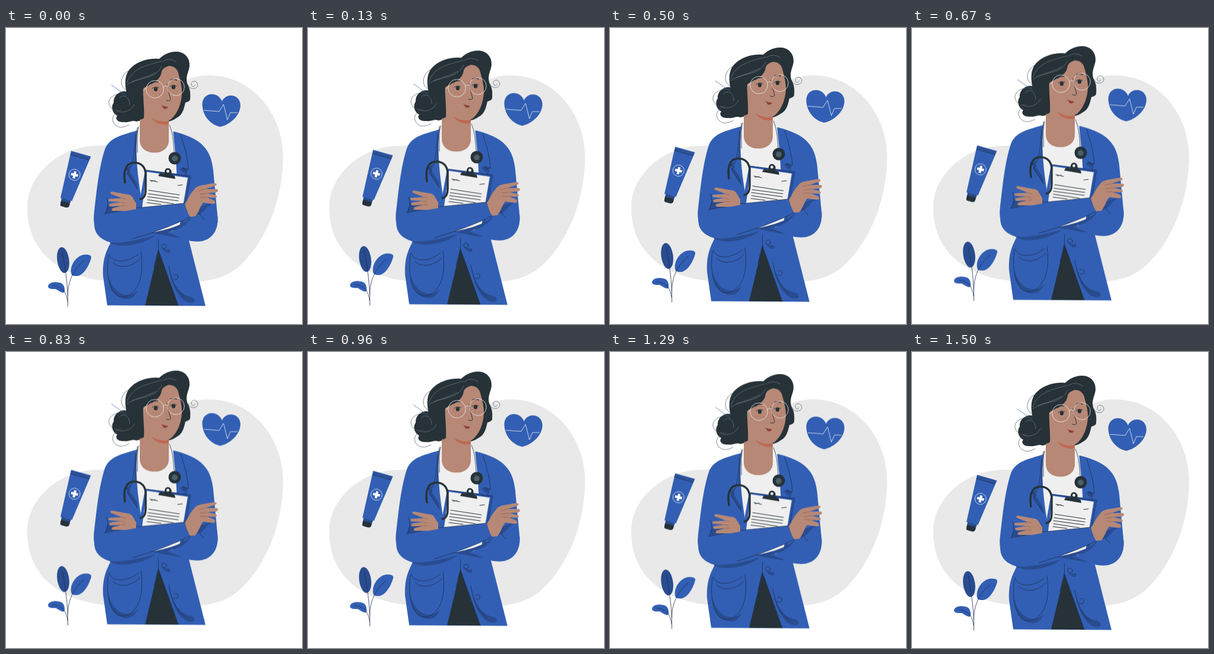
Animation of 500x500 px, one loop 1.54 s. Source, as an HTML page:

```html
<!DOCTYPE html>
<html lang="en">
<head>
<meta charset="utf-8">
<title>Doctor</title>
<style>
html, body { margin: 0; width: 100%; height: 100%; overflow: hidden; background: #fff; }
svg { display: block; width: 100%; height: 100%; }
.float { animation: float 1540ms linear infinite; }
@keyframes float {
  0%, 97.4%, 100% { transform: translateY(0); }
  46.5% { transform: translateY(-10px); }
}
.blue { fill: #325fb4; }
.deep { fill: #294c90; }
.dark { fill: #263238; }
.skin { fill: #b78876; }
.paper { fill: #efefef; }
.line { fill: none; stroke: #1f2f4e; stroke-width: .8; stroke-linecap: round; stroke-linejoin: round; }
.ink { fill: none; stroke: #263238; stroke-width: 1; stroke-linecap: round; }
.brow { fill: none; stroke: #263238; stroke-width: 1.6; stroke-linecap: round; }
.tube { fill: none; stroke: #263238; stroke-width: 3.4; stroke-linecap: round; }
.pale { fill: none; stroke: #f0f0f0; stroke-width: .8; stroke-linejoin: round; }
.curl { fill: none; stroke: #4b565e; stroke-width: .7; }
.lock { fill: none; stroke: #7c8c94; stroke-width: .6; }
</style>
</head>
<body>
<svg viewBox="0 0 500 500">
  <path fill="#e9e9e9" d="M36 300C37 250 88 199 155 199C245 199 250 80 342 80C420 80 468 150 468 216C468 300 432 370 392 404C372 420 350 428 312 429L180 428C95 424 34 380 36 300Z"/>

  <g class="float">
    <g id="heart">
      <path class="blue" d="M365 124C358 106 332 108 331.500 129C332 150 347 164 362 167C379 163 396 148 396 130C395 111 371 109 365 124Z"/>
      <path class="pale" d="M334 139L360 141L367.500 129L374 155L379 143H391"/>
    </g>

    <g id="ointment">
      <path class="blue" d="M110 207.500L143.500 217L111.500 292L92 287Z"/>
      <path fill="none" stroke="#1f2f4e" stroke-width="5" stroke-dasharray=".7 1.800" d="M111 211.500L140.500 220"/>
      <path class="line" d="M109 214L140 223"/>
      <path class="deep" d="M94 287L110 291.500L106 301Q105 304 101 303L94 301Q91 300 92 297Z"/>
      <path class="dark" d="M93 292L105 295Q109 296 107 300L106 302Q104 304 101 303L94 301Q91 300 92 297Z"/>
      <circle class="pale" cx="115.700" cy="248" r="9.500"/>
      <path stroke="#fff" stroke-width="4" d="M110 246.500L121.500 249.500M117.200 242.200L114.300 254"/>
    </g>

    <g id="plant">
      <ellipse class="deep" cx="96.500" cy="392" rx="10" ry="22" transform="rotate(-8 96.500 392)"/>
      <path class="blue" d="M111 417C106 405 116 386 131 383C140 382 146 384 143.500 390C139 405 129 420 118 419Q113 419 111 417Z"/>
      <path class="blue" d="M71 436C73 428 88 428 95 432Q100 437 99 446C95 449 90 444 84 441C77 441 71 441 71 436Z"/>
      <path class="line" d="M104.500 470C105 438 101 410 95 378M104.500 452C104 430 113 408 132 393M104 462C102 444 93 437 79 435"/>
    </g>

    <g id="hair-back">
      <path class="dark" d="M206 108C194 104 181 113 182 126C176 134 181 145 188 148C183 154 190 160 200 159C209 160 214 155 220 158Q228 157 233 153L228 108Z"/>
      <path class="dark" d="M257 54C264 46 276 39 289 40C303 41 311 52 310 64C309 75 302 82 307 96C311 103 312 110 311 121Q310 124 303 126C301 134 299 147 288 152Q281 157 274 158L240 110Z"/>
      <path class="curl" d="M206 111C190 108 172 115 174 128C176 137 187 143 195 138M187 143C179 148 178 157 184 163C190 170 201 168 208 163M208 106C194 104 193 90 197 83Q201 73 210 72"/>
      <path fill="none" stroke="#325fb4" stroke-width=".7" d="M178 96L204 115"/>
      <path class="curl" d="M307 95C309 104 322 105 324 97C324 88 313 88 313 95C313 100 319 100 319 96"/>
    </g>

    <g id="body">
      <path class="blue" d="M222 173C197 181 175 184 167 205C156 238 152 286 148.500 315C146 342 160 358 177 362C167 381 163 394 164 419L171 468.500L337 469.500L309 359C343 365 359 345 357.500 320L350 240C346 205 331 187 284 175Z"/>
      <path class="paper" d="M222 169L229 164L276 163L282 172C285 202 288 225 289 262V290H229C222 250 218 210 222 169Z"/>
      <path class="skin" d="M226 145H275V190C275 203 264 211 251 210.500C237 211 226 203 226 189Z"/>
      <path fill="#bd6954" d="M243 148C251 156 265 160 275 157V162C263 166 249 159 243 148Z"/>
      <path class="line" d="M222 168C219 194 219 208 218 226M224 167C221 177 222 195 222 210M276 164C281 174 283 190 284 211"/>
      <path class="deep" d="M203 238L212 234L208 242L222 263V272L205 247ZM299 235L308 239L302 245L313 253L303 270L306 250L293 238Z"/>
      <path class="line" d="M219 180C217 205 216 219 212 233L203 238L210 242L205 246L222 272M295 180C301 200 307 217 308 239L298 236L306 243L303 248L312 252"/>

      <path class="dark" d="M257.500 375L235 468.500L291 469Z"/>
      <path class="line" d="M257.500 357V375L270 410L291 469M250 404L257 375"/>
      <path class="deep" d="M173 418C179 440 191 451 207 451Q216 449 222 443C217 458 205 460 195 456C181 451 173 437 173 418Z"/>
      <path class="deep" d="M275 402C281 430 290 447 308 453Q319 455 319 461C316 467 304 464 297 457C285 445 279 427 275 402Z"/>
      <path class="deep" d="M174 361C190 366 233 356 252 350C239 362 208 370 189 367Q178 365 174 361Z"/>
      <path class="line" d="M173 384C170 407 171 436 185 450C197 460 213 452 222 436C230 421 231 402 228 378M174 382C180 399 207 396 223 382M181 396C190 407 213 404 226 390M275 402C280 430 287 444 302 455"/>
      <path class="deep" d="M264 372Q269 375 276 374C279 377 278 381 273 380Q267 378 264 372Z"/>
      <circle class="blue" cx="267" cy="369" r="4"/><circle class="line" cx="267" cy="369" r="4"/>
      <path class="line" d="M283 418C287 414 292 418 290 423C288 426 283 426 282 423"/>
    </g>

    <g id="clipboard">
      <path class="deep" d="M238 240L313 249L295 355L220 341Z"/>
      <path class="blue" d="M235 240L309 251L292 355L217 341Z"/>
      <path class="paper" d="M238 243L307 253L290 353L225 340Z"/>
      <path class="line" d="M236 240L309 251"/>
      <path class="ink" d="M243 257L256 260M245 259L252 258M290 266L298 265M241 274L293 282M240 280L292 287M239 285L291 292M239 290L283 297M238 295L262 298"/>
      <path class="dark" d="M257 250L260 245L268 246C267 237 273 235 277 238Q281 241 279 247L285 250L286 255Z"/>
      <circle class="paper" cx="273.500" cy="242" r="2.400"/>
    </g>

    <g id="stethoscope">
      <circle class="dark" cx="285" cy="220" r="10.500"/>
      <circle fill="#4a5f68" cx="285" cy="220.500" r="5"/>
      <path class="tube" d="M201 261C198 244 201 228 216 227.500C230 227 236 237 236 248V272C236 281 234 288 227 289"/>
    </g>

    <g id="arms">
      <path class="deep" d="M245 346C270 341 303 333 313 318L320 306C316 329 300 341 278 343L296 353L288 354Z"/>
      <path class="blue" d="M165 314L221 304L302 296C304 306 307 314 313 318C285 333 242 348 214 356C194 363 178 365 166 358C148 349 146 331 153 315Z"/>
      <path class="blue" d="M313 319C320 309 338 294 354 294L357.500 320C359 346 343 367 309 359L272 345C294 341 307 331 313 319Z"/>
      <path class="deep" d="M311 319C319 311 326 297 351 296Q342 299 337 306C331 314 320 318 311 319Z"/>
      <path class="deep" d="M168 313L221 304L219 291Q201 301 177 296C171 299 169 305 168 313Z"/>
      <path class="line" d="M166 314L220 304L302 296C304 306 307 314 313 318C285 333 242 348 214 356M326 312Q330 320 335 323M170 287Q175 301 168 313"/>
      <path class="skin" d="M220 296L213 285Q210 281 204 281L180 276.500C175 276 175 279.500 179 281L196 287.500L176 288.500C171 289 172 293 177 293L194 294L177 296.500C172 298 174 301.500 178 301.500L195 300.500L181 304C177 306 178 309 182 309L203 309L220 306Z"/>
      <path class="skin" d="M302 297C307 291 309 282 317 274Q320 268 329 266L352 262C357 262 357 266 352 267L337 272L354 272C360 272 359 277 354 278L340 279L353 282C359 284 356 287 351 287L339 286L351 291C356 295 353 297 348 297L333 295C328 301 326 311 320 318L311 319C307 313 304 305 302 297Z"/>
      <path fill="none" stroke="#8f5c4b" stroke-width=".7" d="M196 287.500L202 289M194 294L201 296M195 300.500L202 300M337 272L325 275M340 279L327 281M339 286L328 286"/>
    </g>

    <g id="head">
      <path class="skin" d="M232 96L262 66Q276 61 289 67C292 82 298 97 297 112C296 128 290 143 281 152C274 160 260 159 247 152L232 150Z"/>
      <path class="dark" d="M296 58L261 53Q256 51 248 52C232 53 211 61 204 78C199 91 203 106 205 117C208 134 211 149 219 153Q228 157 233 152C234 136 231 116 232 102C243 94 261 91 263 73Q265 67 275 64C283 64 289 68 292 78Z"/>
      <path class="lock" d="M204 96C224 82 253 88 263 64M204 93C213 66 240 63 263 56M212 91C228 85 240 82 253 75M191 119C198 110 209 117 209 130M186 139C198 146 213 139 217 129M264 57Q275 49 288 57"/>
      <path class="brow" d="M246 94Q250 90 257 91M278 88Q283 85 288 88"/>
      <ellipse class="dark" cx="253" cy="103.500" rx="3.200" ry="3.400"/>
      <ellipse class="dark" cx="283" cy="100" rx="3.200" ry="3.400"/>
      <path class="ink" d="M247 102Q252 98 258 101M277 99Q282 95 288 98M272 95C274 108 277 115 278 121Q276 124 271 122"/>
      <path fill="#8c4033" d="M262 130Q267 133 274 133.500Q271 138 266 136Q265 133 262 130Z"/>
      <g fill="#8f5c4b">
        <circle cx="254" cy="113" r=".7"/><circle cx="259" cy="112" r=".7"/><circle cx="249" cy="111" r=".7"/>
        <circle cx="283" cy="109" r=".7"/><circle cx="289" cy="108" r=".7"/><circle cx="287" cy="112" r=".7"/>
      </g>
      <circle class="pale" cx="251.500" cy="103.500" r="14.800"/>
      <circle class="pale" cx="287" cy="100" r="14.300"/>
      <path class="pale" d="M266 100Q269 96 273 99M237 101L232 105"/>
    </g>
  </g>
</svg>
</body>
</html>
```
